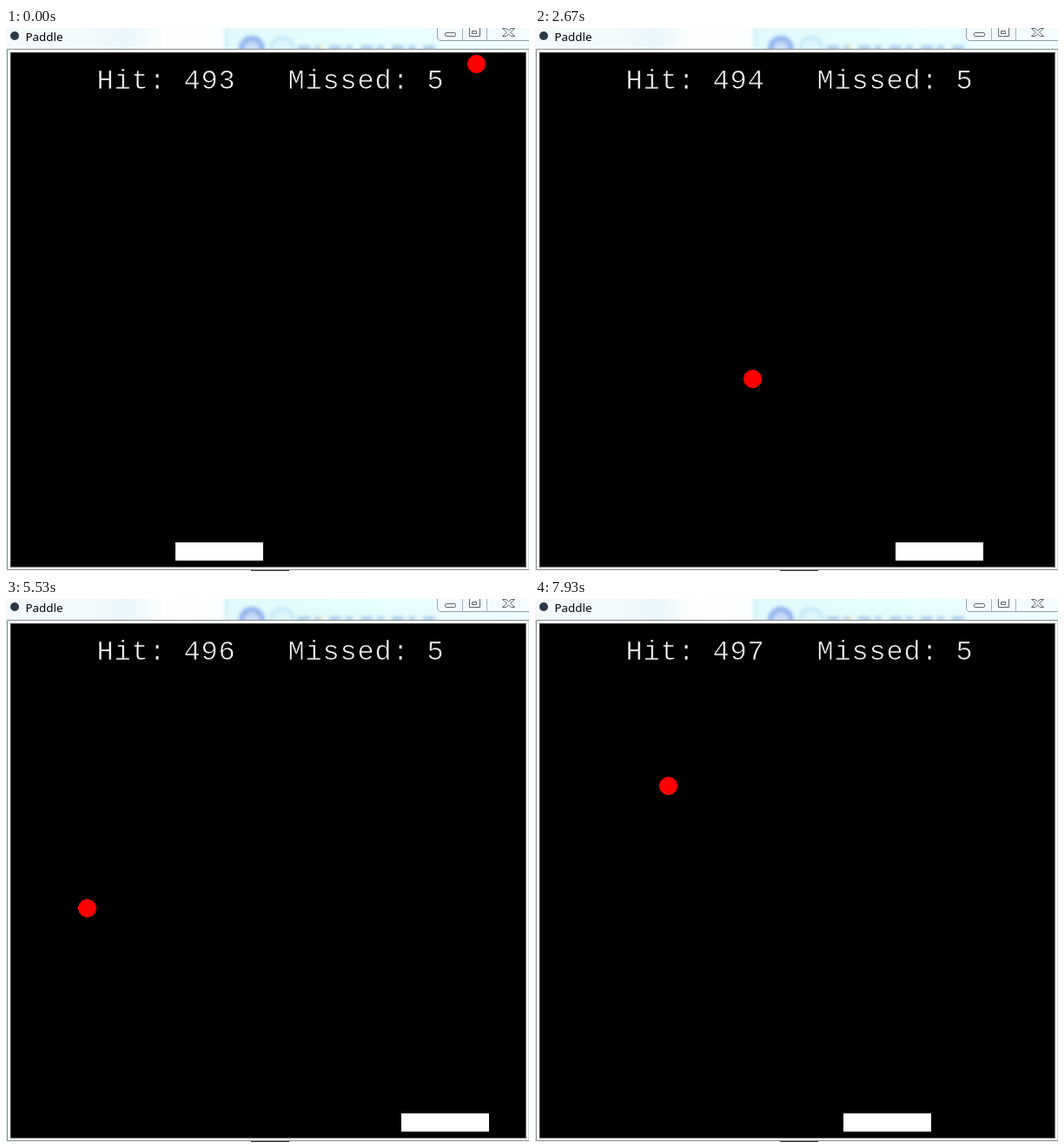
An HTML page that plays this animation: 602 px wide and 626 px high, repeating every 8 s.

```html
<!DOCTYPE html>
<html lang="en">
<head>
<meta charset="utf-8">
<title>Paddle</title>
<style>
  html, body { margin: 0; width: 100%; height: 100%; overflow: hidden; background: #fff; }
  svg { display: block; width: 602px; height: 626px; }
  .title { font: 13.4px "Noto Sans", "Open Sans", sans-serif; fill: #000; }
  .score { font: 32px "Liberation Mono", "Courier New", monospace; letter-spacing: .8px;
           fill: #fff; stroke: #000; stroke-width: .7px; white-space: pre; }
</style>
</head>
<body>
<svg viewBox="0 0 602 626" xmlns="http://www.w3.org/2000/svg">
  <defs>
    <linearGradient id="bar">
      <stop offset="0" stop-color="#f4fafc"/>
      <stop offset=".15" stop-color="#f3fafc"/>
      <stop offset=".23" stop-color="#e9f6fa"/>
      <stop offset=".3" stop-color="#fdfefe"/>
      <stop offset=".41" stop-color="#fbffff"/>
      <stop offset=".43" stop-color="#e2fafd"/>
      <stop offset=".7" stop-color="#e6fdfe"/>
      <stop offset="1" stop-color="#eefcff"/>
    </linearGradient>
    <filter id="soft" x="-30%" y="-50%" width="160%" height="200%"><feGaussianBlur stdDeviation="2"/></filter>
    <clipPath id="barClip"><rect width="602" height="24"/></clipPath>
    <clipPath id="field"><rect x="7" y="30" width="590" height="590"/></clipPath>
  </defs>

  <rect width="602" height="626" fill="#fcfefe"/>
  <rect width="602" height="24" fill="url(#bar)"/>
  <rect y="24" width="1" height="602" fill="#d5eef5"/>
  <g clip-path="url(#barClip)">
    <g filter="url(#soft)">
      <path d="M254 0V24" stroke="#c6e9f2" stroke-width="3"/>
      <circle cx="283" cy="24" r="12" fill="#c9dcf6" stroke="#8eb2ec" stroke-width="6"/>
      <circle cx="318" cy="24" r="13" fill="#dcf5fb" stroke="#b9e0f0" stroke-width="3"/>
      <path d="M336 23H496" stroke="#a3c2ea" stroke-width="5" stroke-dasharray="14 5 8 9"/>
      <path d="M362 20V24" stroke="#e8dd9a" stroke-width="4"/>
    </g>
  </g>

  <circle cx="10" cy="9" r="5" fill="#2b3947"/>
  <text class="title" x="22.5" y="15">Paddle</text>

  <path d="M496.5 -1V10Q496.5 14.500 501 14.500H603V-1Z" fill="#f4fbfd" stroke="#93a1aa"/>
  <path d="M525.5 0V14M553.5 0V14" stroke="#a3b0b8"/>
  <g fill="#fff" stroke="#59616b">
    <rect x="505.5" y="5.500" width="12" height="4" rx="1"/>
    <path d="M533.5 -1V9.500H545.500V-1M536.500 3.500H541.500V6.500H536.500Z"/>
    <path d="M571.500 .5H575.500L578.500 3L581.500 .5H585.500L580.500 5L585.500 9.500H581.500L578.500 7L575.500 9.500H571.500L576.500 5Z"/>
  </g>

  <path d="M603 24.500H1.500V624.500H603" fill="none" stroke="#868b8e"/>
  <path d="M601.500 25V624" stroke="#d6dcdf"/>
  <path d="M282 625.500H326" stroke="#333"/>
  <rect x="5" y="28" width="594" height="594" fill="#000"/>
  <path d="M598.500 28V621.500H5" fill="none" stroke="#777"/>
  <path d="M5.500 621V28.500H598" fill="none" stroke="#333"/>

  <text id="score" class="score" x="104.500" y="70" xml:space="preserve"></text>
  <g clip-path="url(#field)" shape-rendering="crispEdges">
    <rect id="paddle" y="593" width="101" height="21" fill="#fff"/>
    <circle id="ball" r="10.5" fill="#f00"/>
  </g>
</svg>
<script>
const LOOP = 8000, RATE = 15 / 1000, LAST = 119;
const CX = 305.5, CY = 328.5;
const WALL = 290, SPEED = 3, REACH = 240, STRIDE = 20;
const FIRST_HIT = 182, RALLY = 361; // in game steps

// Key poses: the game runs at a slightly uneven pace between them.
const POSES = [
  { n: 0, steps: 0, paddle: -60 },
  { n: 27, steps: 332, paddle: 60 },
  { n: 51, steps: 615, paddle: 240 },
  { n: 69, steps: 812, paddle: 220 },
  { n: 83, steps: 978, paddle: 200 },
  { n: 104, steps: 1215, paddle: 120 },
  { n: LAST, steps: 1386, paddle: 100 },
];

const $ = id => document.getElementById(id);
const score = $("score"), paddle = $("paddle"), ball = $("ball");

const mix = (a, b, k) => a + (b - a) * k;
const bump = d => Math.abs(d) < 1 ? (1 + Math.cos(Math.PI * d)) / 2 : 0;

function poseAt(n) {
  const i = Math.max(1, POSES.findIndex(p => p.n >= n));
  const a = POSES[i - 1], b = POSES[i], k = (n - a.n) / (b.n - a.n);
  return { steps: Math.round(mix(a.steps, b.steps, k)), rest: mix(a.paddle, b.paddle, k) };
}

function play(steps) {
  let x = 236, y = 287, dx = -SPEED, dy = SPEED, hits = 493;
  while (steps-- > 0) {
    x += dx;
    y += dy;
    if (Math.abs(x) > WALL) { x = Math.sign(x) * WALL; dx = -dx; }
    if (y > WALL) { y = WALL; dy = -dy; }
    if (Math.abs(y + 250) < 2) { dy = -dy; hits++; }
  }
  return { x, y, hits };
}

// The paddle swings under the ball for each hit, then off to the right wall.
function paddleAt(steps, rest) {
  const hit = FIRST_HIT + RALLY * Math.max(0, Math.round((steps - FIRST_HIT) / RALLY));
  const since = steps - hit;
  const landing = Math.max(-REACH, play(hit).x);
  let x = mix(rest, REACH, bump((since - 46) / 26));
  x = mix(x, landing, bump(since / 48));
  return Math.round(x / STRIDE) * STRIDE;
}

function draw(time) {
  const n = Math.min(LAST, Math.floor((time % LOOP + 4) * RATE));
  const { steps, rest } = poseAt(n);
  const { x, y, hits } = play(steps);
  ball.setAttribute("cx", CX + x);
  ball.setAttribute("cy", CY - y);
  paddle.setAttribute("x", CX - 50.5 + paddleAt(steps, rest));
  score.textContent = `Hit: ${hits}   Missed: 5`;
}

let start;
function tick(now) {
  start ??= now;
  draw(now - start);
  requestAnimationFrame(tick);
}
draw(0);
requestAnimationFrame(tick);
</script>
</body>
</html>
```
